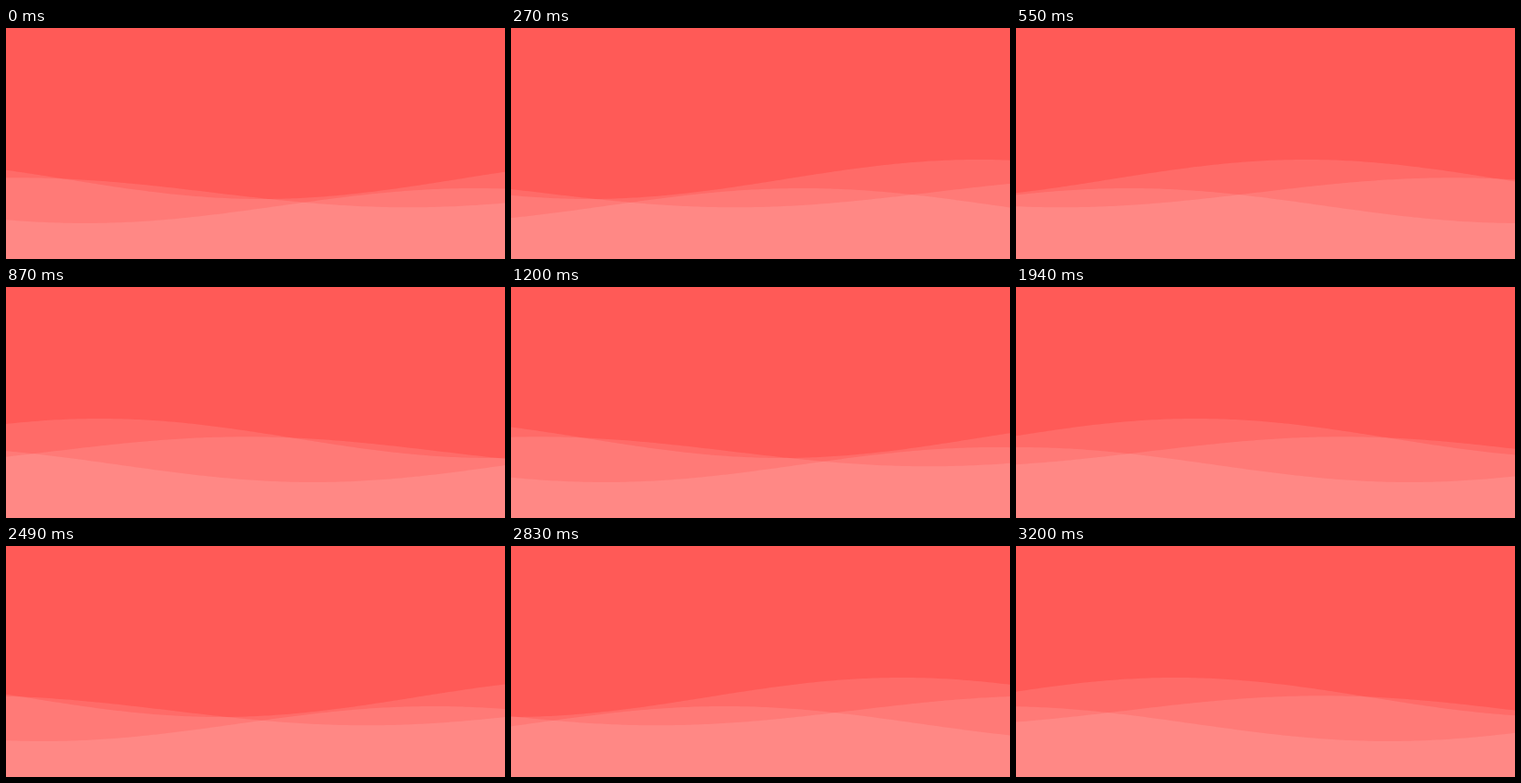
These frames come from a looping animation (556 by 258 pixels, 3300 ms). An HTML page:

```html
<!DOCTYPE html>
<html lang="en">
<head>
<meta charset="utf-8">
<title>Waves</title>
<style>
  html, body { margin: 0; width: 100%; height: 100%; overflow: hidden; background: #ff5a57; }
  svg { display: block; width: 556px; height: 258px; }
  path { fill: #fff; fill-opacity: .1; }
</style>
</head>
<body>
<svg viewBox="0 0 556 258">
  <path/>
  <path/>
  <path/>
</svg>
<script>
const WIDTH = 556, HEIGHT = 258;
const LOOP = 3300;
const STEPS = 115, MOVING_TIME = 3200; // the last step holds until the loop ends
const STEP_SHIFT = 19.85;              // px to the left per step
const WAVELENGTH = 870;

// crest: x of a crest at the start of the loop
const waves = [
  { mid: 169, amp: 22, crest: -150 },
  { mid: 183.8, amp: 16.5, crest: 13 },
  { mid: 198.5, amp: 19.5, crest: 523 },
];
const paths = document.querySelectorAll('path');

function stepAt(time) {
  return Math.min(STEPS, Math.floor(time * STEPS / MOVING_TIME + 0.68));
}

function wavePath({ mid, amp, crest }, shift) {
  let d = `M0 ${HEIGHT}`;
  for (let x = 0; x <= WIDTH; x += 4) {
    const y = mid - amp * Math.cos((x - crest + shift) * 2 * Math.PI / WAVELENGTH);
    d += `L${x} ${y.toFixed(2)}`;
  }
  return d + `V${HEIGHT}Z`;
}

function draw(time) {
  const shift = stepAt(time) * STEP_SHIFT;
  waves.forEach((wave, i) => paths[i].setAttribute('d', wavePath(wave, shift)));
}

const start = performance.now();
function tick() {
  draw((performance.now() - start) % LOOP);
  requestAnimationFrame(tick);
}
tick();
</script>
</body>
</html>
```
